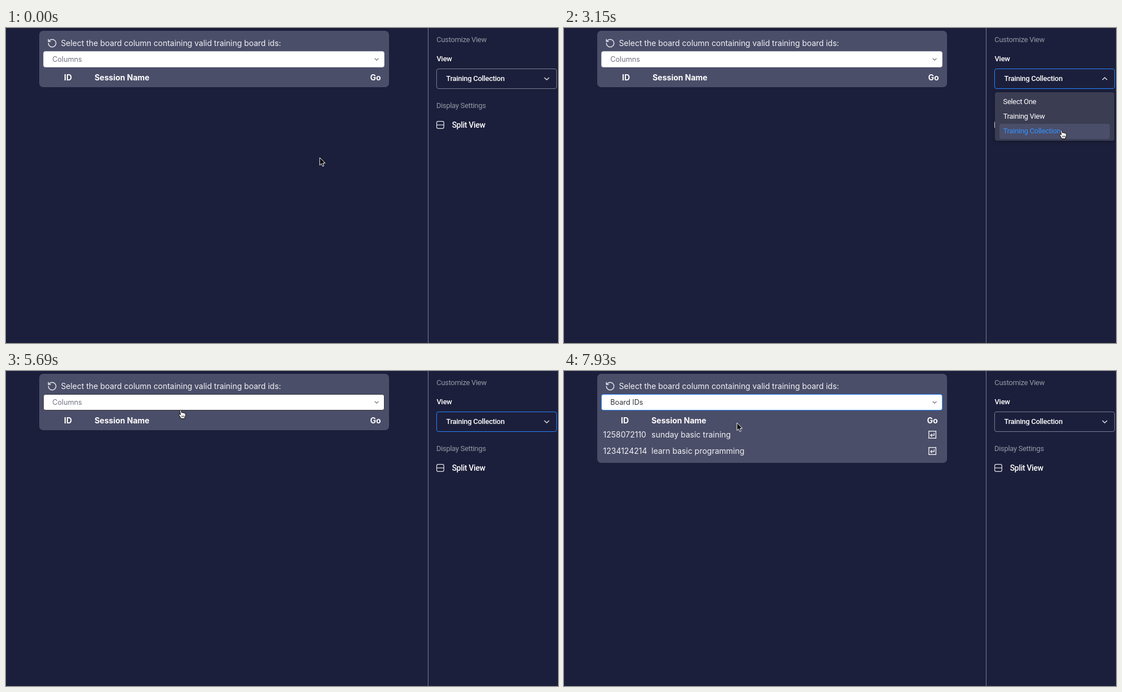
An HTML page for the animation above (8 s loop, 980x559 px).

```html
<!DOCTYPE html>
<html lang="en">
<head>
<meta charset="utf-8">
<title>Training Collection</title>
<style>
  html, body { margin: 0; width: 100%; height: 100%; overflow: hidden; background: #1c1f3b; }
  svg { display: block; width: 980px; height: 559px; }
  text { white-space: pre; }
  .main { font: 14px Inter, sans-serif; fill: #f1f1f5; }
  .head { font-weight: 700; fill: #fff; }
  .field { font: 12.7px Inter, sans-serif; fill: #323338; }
  .side { font: 13px Roboto, sans-serif; letter-spacing: -.3px; fill: #fff; }
  .side .label { fill: #9699a6; }
  .side .strong { font-weight: 500; }
  .line { fill: none; stroke: #e3e4ea; }
  .menu { filter: drop-shadow(0 2px 3px #0004); }
</style>
</head>
<body>
<svg viewBox="0 0 980 559">
  <g class="main">
    <rect id="panel" x="59" y="5" width="621" height="100" rx="7" fill="#4b4e69"/>
    <path class="line" transform="translate(73 18) scale(.75)" stroke-width="2" stroke-linecap="round" stroke-linejoin="round"
      d="M3 12a9 9 0 1 0 9-9 9.75 9.75 0 0 0-6.74 2.74L3 8M3 3v5h5"/>
    <text x="97.4" y="32" letter-spacing="-.03">Select the board column containing valid training board ids:</text>
    <g id="heads" class="head">
      <text x="103" y="93">ID</text>
      <text x="157.2" y="93">Session Name</text>
      <text x="646.4" y="93">Go</text>
    </g>
    <g id="rows">
      <text x="69.5" y="118">1258072110</text>
      <text x="155.3" y="118">sunday basic training</text>
      <text x="69.5" y="147">1234124214</text>
      <text x="155.3" y="147">learn basic programming</text>
      <g id="go" class="line" stroke-width="1.5">
        <path d="M647.7 106.7h12.6v12.6h-12.6zM657 110v4h-6m2.3-2.4-2.4 2.4 2.4 2.4"/>
      </g>
      <use href="#go" y="29"/>
    </g>
  </g>

  <g class="field">
    <rect id="leftBox" x="66.5" y="41.5" width="605" height="28" rx="3.5" fill="#fff"/>
    <text id="value" x="82.2" y="60"></text>
    <path id="leftArrow" fill="none" stroke="#676879" stroke-width="1.2"/>
    <path id="leftCaret" d="M81.5 48v15" stroke="#323338"/>
    <g id="leftMenu">
      <rect class="menu" x="67" y="76" width="604" height="34" rx="4" fill="#fff"/>
      <rect x="74" y="80" width="590" height="26" rx="3" fill="#e6e9ec"/>
      <text x="80.2" y="97">Board IDs</text>
    </g>
  </g>

  <path d="M749.5 0v559" stroke="#797e93"/>
  <g class="side">
    <text class="label" x="764.3" y="25">Customize View</text>
    <text class="strong" x="764.5" y="59">View</text>
    <rect id="rightBox" x="764.5" y="72.5" width="213" height="35" rx="3.5" fill="none"/>
    <text class="strong" x="781.6" y="94">Training Collection</text>
    <path d="M781 96.5h106v3h-106z" fill="#1c1f3b"/>
    <path id="rightArrow" class="line" stroke-width="1.4"/>
    <path id="rightCaret" d="M780.5 82v15" stroke="#fff"/>
    <text class="label" x="764" y="142">Display Settings</text>
    <path class="line" stroke-width="1.2" d="M764.6 172h13"/>
    <rect class="line" stroke-width="1.2" x="764.6" y="165.6" width="12.8" height="12.8" rx="2.8"/>
    <text class="strong" x="791.7" y="177" font-size="14" style="font-size:14px">Split View</text>
    <g id="rightMenu">
      <rect class="menu" x="765" y="114" width="212" height="86" rx="4" fill="#3b3d53"/>
      <rect id="focus" x="773" width="196" height="27" rx="4" fill="#4b4e69"/>
      <text x="779.5" y="135">Select One</text>
      <text x="779.7" y="161">Training View</text>
      <text x="779.7" y="187" style="fill:#3391ff">Training Collection</text>
    </g>
  </g>

  <g id="cursor">
    <path id="arrow" fill="#000" stroke="#fff" stroke-linejoin="round"
      d="M0 0V13.5L3 10.7 5.1 15.5 7.4 14.5 5.4 9.8H9.7Z"/>
    <g id="hand" stroke="#000" stroke-linejoin="round">
      <path fill="#fff" d="M-2.4.2Q-1.6-1.2-.3-.4.3.2.7 3.8 2.2 2.9 3.2 4.3 4.6 3.6 5.5 4.9 7.3 4.4 7.9 6.2 8.5 10 6.6 12V14.4H-.6Q-1 12.2-3.2 9.4-4.8 7.2-3.9 6.6-2.7 6-1.2 7.8Z"/>
      <path d="M1.2 9v3M3.2 9v3M5.2 9v3" stroke-width=".8"/>
    </g>
  </g>
</svg>
<script>
const LOOP = 8000, STEP = 150, BLUE = '#2684ff';
const $ = id => document.getElementById(id);
const show = (id, on) => $(id).style.display = on ? '' : 'none';

// Pointer hotspot: time, x, y
const path = [
  [300, 557, 230], [900, 902, 87], [1200, 902, 87], [1800, 909, 89], [2700, 884, 182],
  [3900, 884, 182], [4650, 886, 96], [4800, 886, 96], [5690, 311, 70], [5990, 311, 60],
  [6440, 311, 60], [7190, 307, 92]
];

// The pointer moves in steps, with a slight shift of the beat late in the loop
function tick(t) {
  const base = t < 5540 ? 0 : 5540;
  return base + Math.floor((t - base) / STEP) * STEP;
}

function pointer(t) {
  const i = path.findIndex(p => p[0] > t);
  if (i === 0) return path[0].slice(1);
  if (i < 0) return path[path.length - 1].slice(1);
  const [t0, x0, y0] = path[i - 1], [t1, x1, y1] = path[i];
  const u = (t - t0) / (t1 - t0), k = u * u * (3 - 2 * u);
  return [x0 + (x1 - x0) * k, y0 + (y1 - y0) * k];
}

const chevron = (x, y, r, up) =>
  `M${x - r} ${y + (up ? r : -r) / 2}L${x} ${y + (up ? -r : r) / 2}L${x + r} ${y + (up ? r : -r) / 2}`;

function draw(t) {
  const [x, y] = pointer(tick(t));
  const over = (l, top, r, b) => x >= l && x <= r && y >= top && y <= b;
  const rightOpen = t >= 1650 && t < 3600;
  const leftOpen = t >= 6140 && t < 7640;
  const chosen = t >= 7640, loaded = t >= 7930;

  $('rightBox').setAttribute('stroke', t >= 1650 && t < 6140 ? BLUE : '#797e93');
  $('rightArrow').setAttribute('d', chevron(960, 90, 4.2, rightOpen));
  show('rightMenu', rightOpen);
  show('rightCaret', rightOpen && (t < 2250 || t >= 2700 && t < 3150));
  const row = y < 114 ? 2 : Math.min(2, Math.max(0, Math.floor((y - 117) / 26)));
  $('focus').setAttribute('y', 118 + row * 26);

  const onLeft = over(66, 41, 672, 71);
  $('leftBox').setAttribute('stroke', t >= 6140 ? BLUE : onLeft ? '#323338' : '#c5c7d0');
  $('leftArrow').setAttribute('d', chevron(658, 55.5, 3.4, leftOpen));
  $('value').textContent = chosen ? 'Board IDs' : 'Columns';
  $('value').style.fill = chosen ? '' : '#6f7080';
  show('leftMenu', leftOpen);
  show('leftCaret', leftOpen && (t < 6740 || t >= 7190));

  show('rows', loaded);
  $('panel').setAttribute('height', loaded ? 158 : 100);
  $('heads').setAttribute('transform', `translate(${loaded ? -2 : 0} 0)`);

  const hand = onLeft || over(764, 72, 978, 108) || over(764, 152, 978, 192) ||
    rightOpen && over(765, 114, 977, 200) || t >= 6140 && t < 7790 && over(74, 80, 664, 106);
  show('hand', hand);
  show('arrow', !hand);
  $('cursor').setAttribute('transform', `translate(${x} ${y})`);
}

const start = performance.now();
function frame() {
  draw((performance.now() - start) % LOOP);
  requestAnimationFrame(frame);
}
frame();
</script>
</body>
</html>
```
